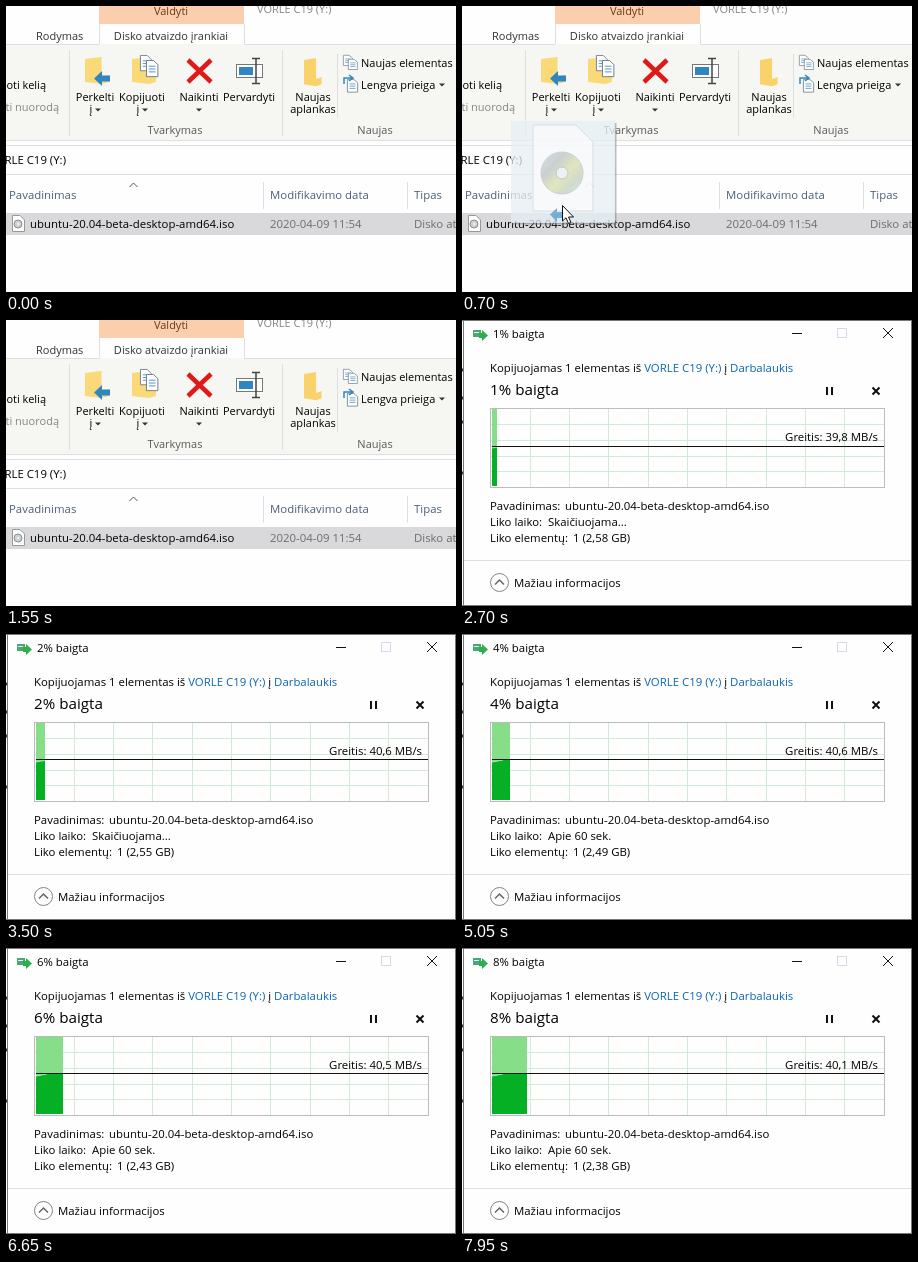
These frames come from a looping animation (450 px wide and 286 px high, 8000 ms). An HTML page:

```html
<!DOCTYPE html>
<html lang="lt">
<head>
<meta charset="utf-8">
<style>
html, body { margin: 0; width: 100%; height: 100%; overflow: hidden; background: #fefefe; }
svg { display: block; width: 450px; height: 286px; font: 11.4px "Open Sans", "Noto Sans", sans-serif; fill: #000; }
text { white-space: pre; }
.mid { text-anchor: middle; }
.end { text-anchor: end; }
.dim { fill: #858585; }
.head { fill: #4c607a; }
.line { fill: none; stroke: #dfdfe3; }
.link { fill: #0a66b4; }
.rib text { font-size: 11px; }
</style>
</head>
<body>
<svg viewBox="0 0 450 286">
  <defs>
    <clipPath id="done"><rect id="doneBox" x="30" y="89" width="6" height="77"/></clipPath>
    <linearGradient id="disc" x2="1" y2="1">
      <stop offset="0" stop-color="#d6dcdf"/><stop offset=".3" stop-color="#c2c9cc"/>
      <stop offset=".55" stop-color="#dfe3b4"/><stop offset=".75" stop-color="#c9d6c4"/><stop offset="1" stop-color="#dfe3e8"/>
    </linearGradient>
    <path id="folder" d="M0 2 L11 0 V20 L16 18 V25 L11 27 L0 25Z"/>
    <path id="drop" d="M-3 -1.5 H3 L0 1.5Z" fill="#333"/>
    <g id="sheet"><path d="M.5 .5 H8 L12.500 5 V17.500 H.5Z" fill="#fefefe" stroke="#6d7d88"/><path d="M3 6.500 H10 M3 9.500 H10 M3 12.500 H10" stroke="#4d91c4"/></g>
  </defs>

  <g id="explorer">
    <rect width="450" height="286" fill="#fefefe"/>
    <rect x="93" width="145" height="18" fill="#fbcfae"/>
    <path class="line" d="M93.500 18 V38 M238.500 18 V38"/>
    <rect y="38" width="450" height="96" fill="#f6f6f3"/>
    <path class="line" d="M0 38.500 H93 M238 38.500 H450 M0 134.500 H450 M0 139.500 H450 M0 168.500 H450"/>
    <path class="line" d="M63.500 44 V130 M276.500 44 V130 M331.500 48 V112"/>
    <g class="rib">
      <text x="165" y="9" class="mid" fill="#6b3a18">Valdyti</text>
      <text x="251" y="7" class="dim">VORLE C19 (Y:)</text>
      <text x="30" y="34" fill="#333">Rodymas</text>
      <text x="165" y="34" class="mid" fill="#333">Disko atvaizdo įrankiai</text>
      <text x="40" y="83" class="end">Kopijuoti kelią</text>
      <text x="53" y="105" class="end dim">Įklijuoti nuorodą</text>
      <g class="mid">
        <text x="89" y="95">Perkelti</text><text x="85" y="107">į</text>
        <text x="136" y="95">Kopijuoti</text><text x="132" y="107">į</text>
        <text x="193" y="95">Naikinti</text>
        <text x="243" y="95">Pervardyti</text>
        <text x="307" y="95">Naujas</text><text x="307" y="107">aplankas</text>
        <text x="169" y="128" fill="#5a5a5a">Tvarkymas</text>
        <text x="369" y="128" fill="#5a5a5a">Naujas</text>
      </g>
      <text x="355" y="61">Naujas elementas</text>
      <text x="355" y="83">Lengva prieiga</text>
    </g>
    <use href="#drop" x="92" y="104"/><use href="#drop" x="139" y="104"/>
    <use href="#drop" x="193" y="104"/><use href="#drop" x="436" y="79"/>

    <use href="#folder" transform="translate(79 51) scale(1.500 1)" fill="#f9d978"/>
    <path d="M88 72.500 L96 65 V69.500 H104 V75.500 H96 V80Z" fill="#2f86c0"/>
    <use href="#folder" transform="translate(126 51) scale(1.500 1)" fill="#f9d978"/>
    <use href="#sheet" transform="translate(134 49) scale(.9)"/><use href="#sheet" transform="translate(140 54) scale(.95)"/>
    <path d="M182 54 L205 76 M205 54 L182 76" stroke="#e01818" stroke-width="4.500"/>
    <rect x="230.500" y="58.500" width="26" height="13" fill="#fefefe" stroke="#777"/>
    <rect x="233" y="61" width="14" height="8" fill="#2f86c0"/>
    <path d="M246 52.500 H254 M250 53 V77 M246 77.500 H254" stroke="#444" stroke-width="1.500"/>
    <use href="#folder" transform="translate(298 52) scale(1.100 1.050)" fill="#f9d26c"/>
    <use href="#sheet" transform="translate(337 49) scale(.75 .6)"/>
    <use href="#sheet" transform="translate(342 53) scale(.75 .6)"/>
    <use href="#sheet" transform="translate(341 73) scale(.85 .75)"/>
    <path d="M338 78 V72 H346 M343 69 L347 72 L343 75" fill="none" stroke="#2f86c0" stroke-width="1.500"/>

    <text x="60" y="158" class="end">VORLE C19 (Y:)</text>
    <path d="M123.500 181 L127.500 177 L131.500 181" fill="none" stroke="#555"/>
    <path class="line" d="M257.500 176 V203 M401.500 176 V203"/>
    <g class="head">
      <text x="3" y="193">Pavadinimas</text>
      <text x="264" y="193">Modifikavimo data</text>
      <text x="408" y="193">Tipas</text>
    </g>
    <rect y="207" width="450" height="22" fill="#d9d9dc"/>
    <path d="M6.500 209.500 H14 L18.500 214 V225.500 H6.500Z" fill="#fefefe" stroke="#999"/>
    <circle cx="12" cy="218" r="4" fill="#ccd2d2" stroke="#8a9090"/><circle cx="12" cy="218" r="1" fill="#fefefe"/>
    <text x="24" y="222">ubuntu-20.04-beta-desktop-amd64.iso</text>
    <g fill="#6d6d6d">
      <text x="264" y="222">2020-04-09 11:54</text>
      <text x="408" y="222">Disko atvaizdo failas</text>
    </g>

    <g id="pointer">
      <g id="ghost">
        <path d="M-50 18.500 H53.500 V-82" fill="none" stroke="#66707a" stroke-width="2" opacity=".45"/>
        <rect x="-51" y="-84" width="104" height="102" fill="#e6eff4" opacity=".75"/>
        <path d="M-29 -80 H14 L31 -63 V6 H-29Z" fill="#fcfcfc" stroke="#d0d6da" opacity=".7"/>
        <circle cy="-32" r="21" fill="url(#disc)" stroke="#c0c8cc" opacity=".85"/>
        <circle cy="-32" r="6" fill="#eef1f2" stroke="#c0c8cc"/>
        <path d="M-12 9.500 L-5 3 V7 H4 V13 H-5 V17Z" fill="#2f86c0" opacity=".6"/>
      </g>
      <path d="M.5 .5 V16 L4 12.800 L6.500 18.500 L9 17.400 L6.500 12 H11.500Z" fill="#fff" stroke="#111"/>
    </g>
  </g>

  <g id="dialog">
    <rect width="450" height="286" fill="#fefefe"/>
    <path d="M0 .5 H450 M1.500 0 V286 M449.500 0 V286 M0 285.500 H450" stroke="#777" fill="none"/>
    <path d="M0 50 H1 M0 78 H1 M0 102 H1 M0 153 H1" stroke="#333" stroke-width="3"/>
    <rect x="11" y="10" width="8" height="7" fill="#4aa878"/><path d="M12 12.500 H17" stroke="#e4f2ea"/>
    <path d="M17 13 H20 V10 L26 15.500 L20 21 V18 H17Z" fill="#2fae4c"/>
    <text x="31" y="18" class="pct"></text>
    <path d="M330 13.500 H340 M421 8 L431 18 M431 8 L421 18" stroke="#111"/>
    <rect x="375.500" y="8.500" width="9" height="9" fill="none" stroke="#d6d8ec"/>
    <text x="28" y="52">Kopijuojamas 1 elementas iš <tspan class="link">VORLE C19 (Y:)</tspan> į <tspan class="link">Darbalaukis</tspan></text>
    <text x="28" y="75" class="pct" font-size="15.200"></text>
    <path d="M365 67 V75 M370 67 V75 M410.500 67.500 L417.500 74.500 M417.500 67.500 L410.500 74.500" stroke="#111" stroke-width="2"/>

    <path id="grid" fill="none" stroke="#d2ead6"/>
    <g clip-path="url(#done)">
      <rect x="30" y="89" width="392" height="78" fill="#86de88"/>
      <path d="M30 167 V128 L41 126 H422 V167Z" fill="#06b025"/>
      <path d="M30 128 L41 126" stroke="#a8e8aa"/>
    </g>
    <rect x="28.500" y="88.500" width="394" height="79" fill="none" stroke="#bcbcbc"/>
    <path id="level" d="M30 0 H422" stroke="#111"/>
    <text id="speed" x="416" y="121" class="end"></text>

    <text x="28" y="190">Pavadinimas:</text><text x="103" y="190">ubuntu-20.04-beta-desktop-amd64.iso</text>
    <text x="28" y="206">Liko laiko:</text><text id="left" x="86" y="206"></text>
    <text x="28" y="222">Liko elementų:</text><text id="items" x="111" y="222"></text>
    <path class="line" d="M2 240.500 H449"/>
    <circle cx="37.500" cy="262.500" r="9" fill="none" stroke="#858585"/>
    <path d="M33 264.500 L37.500 260 L42 264.500" fill="none" stroke="#666" stroke-width="1.500"/>
    <text x="52" y="267">Mažiau informacijos</text>
  </g>
</svg>
<script>
const $ = id => document.getElementById(id);
const LOOP = 8000, COPY = 2700;
// Keys are [time, ...values]
const pathKeys = [[100, 150, 290], [450, 100, 222], [650, 100, 219], [1050, 100, 62], [1550, 85, -30]];
const speedKeys = [[2700, 39.8], [3300, 40.6], [5050, 40.6], [6650, 40.5], [7950, 40.1]];

function at(keys, t) {
  const i = keys.findIndex(k => k[0] > t);
  if (i < 0) return keys.at(-1).slice(1);
  if (!i) return keys[0].slice(1);
  const a = keys[i - 1], b = keys[i], f = (t - a[0]) / (b[0] - a[0]);
  return a.slice(1).map((v, n) => v + (b[n + 1] - v) * f);
}
const comma = (n, digits) => n.toFixed(digits).replace('.', ',');
const show = (id, on) => $(id).setAttribute('display', on ? 'inline' : 'none');

let grid = '';
for (let i = 1; i < 10; i++) grid += `M${Math.floor(29 + i * 39.3) + .5} 89 V167`;
for (let i = 1; i < 5; i++) grid += `M29 ${Math.floor(88.7 + i * 15.8) + .5} H422`;
$('grid').setAttribute('d', grid);

function drawDrag(t) {
  const [x, y] = at(pathKeys, t);
  show('pointer', t >= 100 && t < 1550);
  show('ghost', t >= 700);
  $('pointer').setAttribute('transform', `translate(${Math.round(x)} ${Math.round(y)})`);
}

function drawCopy(t) {
  const dt = t - COPY, speed = at(speedKeys, t)[0];
  const percent = Math.floor(8 + (t - 7400) / 691);
  document.querySelectorAll('.pct').forEach(e => e.textContent = percent + '% baigta');
  $('doneBox').setAttribute('width', Math.floor(5.2 + dt * .0057));
  $('level').setAttribute('transform', `translate(0 ${speed < 40 ? 126.5 : 125.5})`);
  $('speed').textContent = `Greitis: ${comma(speed, 1)} MB/s`;
  $('left').textContent = t < 4400 ? 'Skaičiuojama...' : 'Apie 60 sek.';
  $('items').textContent = `1 (${comma(2.583 - dt * .000038, 2)} GB)`;
}

function frame(now) {
  const t = Math.floor(now % LOOP / 50) * 50, copying = t >= COPY;
  show('explorer', !copying);
  show('dialog', copying);
  (copying ? drawCopy : drawDrag)(t);
  requestAnimationFrame(frame);
}
frame(performance.now());
</script>
</body>
</html>
```
